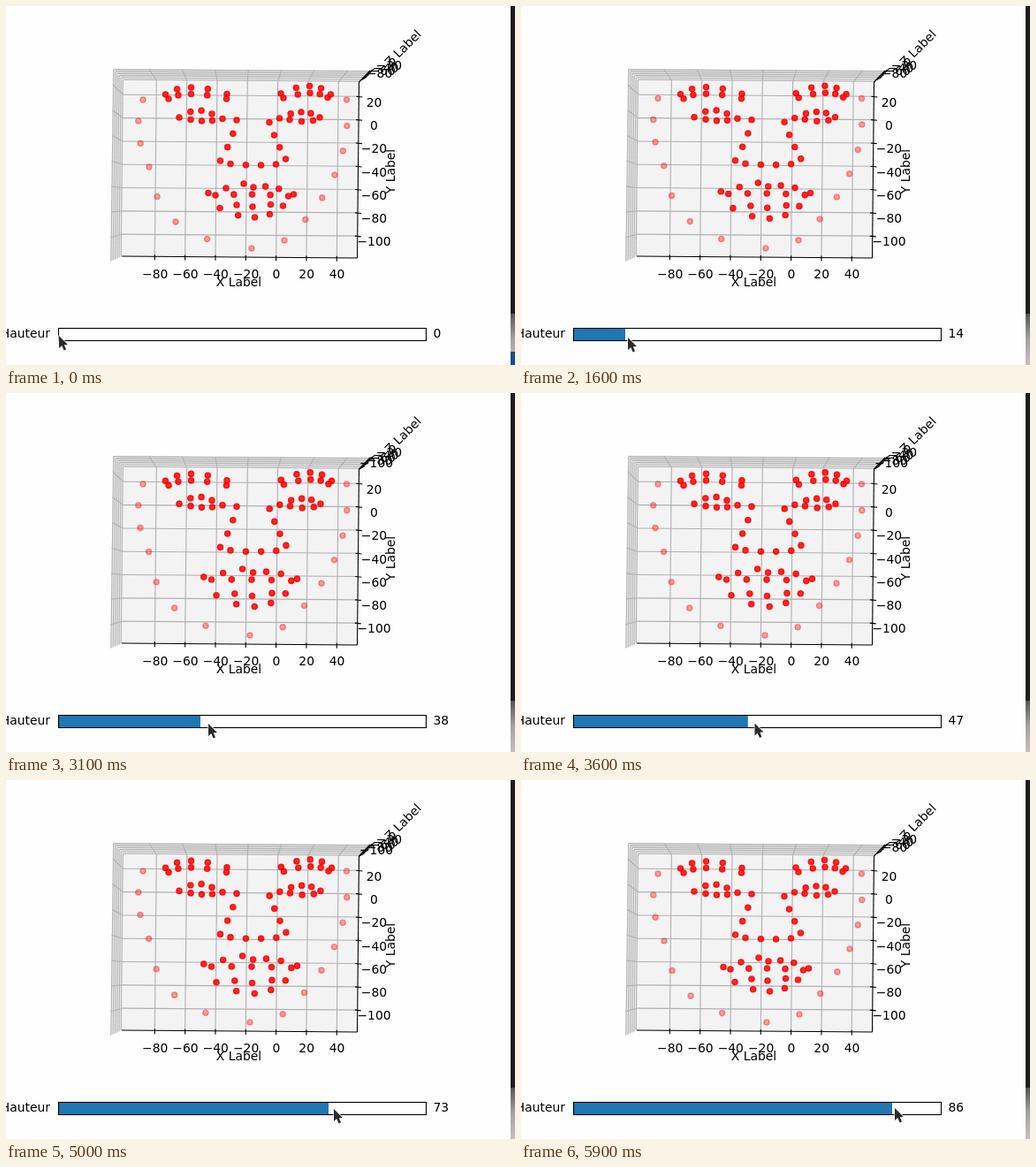
These frames come from a looping animation (576x406 px, 6000 ms). An HTML page with a canvas:

```html
<!DOCTYPE html>
<html lang="fr">
<head>
<meta charset="utf-8">
<style>
html, body { margin: 0; width: 100%; height: 100%; overflow: hidden; background: #fefefe; }
canvas { display: block; }
</style>
</head>
<body>
<canvas id="stage" width="576" height="406"></canvas>
<script>
const ctx = document.getElementById('stage').getContext('2d');
const LOOP = 6000, STEP = 100;

const clamp = v => Math.max(0, Math.min(1, v));
const lerp = (a, b, k) => a + (b - a) * k;
const mix = (p, q, k) => [lerp(p[0], q[0], k), lerp(p[1], q[1], k)];

// n points along the parabola through a start, a middle and an end point
function arc(n, x0, y0, xm, ym, x1, y1) {
  return Array.from({ length: n }, (_, i) => {
    const k = i / (n - 1);
    const fit = (a, m, b) => a * (1 - k) * (1 - 2 * k) + m * 4 * k * (1 - k) + b * k * (2 * k - 1);
    return [fit(x0, xm, x1), fit(y0, ym, y1)];
  });
}

// Each part of the face: its curves and how far a point moves when the mouth is open
const jaw = {
  alpha: 0.36,
  points: [
    arc(4, 155, 106, 150, 142.5, 162, 182),
    arc(4, 171, 215.5, 208, 255, 278, 274),
    arc(7, 315, 265, 372, 191, 385.5, 106)
  ].flat(),
  shift(x, y) {
    const k = ((y - 106) / 168) ** 2;
    return [-2 * k, -3 * (1 - k)];
  }
};
const upper = {
  alpha: 0.84,
  points: [
    arc(5, 180.5, 100, 209.5, 92, 250, 99.5),
    arc(5, 184, 105, 209.5, 99.5, 249.5, 105),
    arc(5, 311, 99, 343.5, 90.5, 367.5, 100),
    arc(5, 314, 104, 344, 98.5, 364, 103.5),
    arc(4, 196, 126, 215, 118.3, 233, 122),
    arc(4, 209, 128.5, 227.5, 130, 245, 127.5),
    arc(5, 309.5, 127, 334, 120, 355, 126),
    arc(3, 321, 128.5, 334.5, 130.5, 347.5, 129.5),
    arc(4, 261, 129, 254, 152, 242.5, 175),
    arc(4, 298, 131.5, 306.5, 153, 316.5, 173),
    arc(4, 254, 178.5, 280, 180, 305.5, 179)
  ].flat(),
  shift: x => [Math.max(0, x - 280) * 0.012, -0.6]
};
const mouth = {
  alpha: 0.84,
  points: [
    arc(3, 229, 211.5, 249, 206, 269, 201),
    arc(4, 280, 205, 301, 205, 325.5, 213),
    arc(5, 242, 228.5, 281.5, 239, 313.5, 226),
    arc(5, 237, 214, 278.5, 213, 319.5, 215),
    arc(3, 261, 225, 279, 227, 299.5, 224.5)
  ].flat(),
  shift: (x, y) => [
    (x - 284) * 0.095,
    y < 220 ? -1.9 - ((x - 283) / 44) ** 2 : 2.5 * (1 - ((x - 280) / 40) ** 2)
  ]
};

// Value at time t on a path of [time, value] pairs
function track(keys, t) {
  let i = 1;
  while (i < keys.length - 1 && t > keys[i][0]) i++;
  const [t0, a] = keys[i - 1], [t1, b] = keys[i];
  return lerp(a, b, clamp((t - t0) / (t1 - t0)));
}

const sliderKeys = [[1600, 118], [2300, 165], [3100, 220], [4200, 301], [5000, 365], [5900, 420]];
const pointerGap = [[0, 0.5], [1600, 3], [2300, 3], [3100, 9], [4200, 6], [5000, 6], [5900, 3]];
const pointerY = [[0, 372], [1600, 374], [2300, 374], [5900, 370]];

const sliderX = t => t < 1600 ? 59.5 + 58.5 * clamp((t - 200) / 1400) ** 1.6 : track(sliderKeys, t);

function line([x0, y0], [x1, y1], color = '#b0b0b0') {
  ctx.strokeStyle = color;
  ctx.lineWidth = 1.1;
  ctx.beginPath();
  ctx.moveTo(x0, y0);
  ctx.lineTo(x1, y1);
  ctx.stroke();
}

function shape(points, fill) {
  ctx.fillStyle = fill;
  ctx.beginPath();
  points.forEach(([x, y]) => ctx.lineTo(x, y));
  ctx.closePath();
  ctx.fill();
}

function text(str, x, y, align = 'center', angle = 0) {
  ctx.save();
  ctx.translate(x, y);
  ctx.rotate(angle);
  ctx.font = '13.89px "DejaVu Sans", sans-serif';
  ctx.textAlign = align;
  ctx.fillStyle = '#000';
  ctx.fillText(String(str).replace('-', '\u2212'), 0, 5);
  ctx.restore();
}

function drawFacePart({ points, shift, alpha }, open) {
  ctx.fillStyle = ctx.strokeStyle = `rgba(255,0,0,${alpha})`;
  ctx.lineWidth = 1.39;
  for (const [x, y] of points) {
    const [dx, dy] = shift(x, y);
    ctx.beginPath();
    ctx.arc(x + dx * open, y + dy * open, 3.1, 0, 7);
    ctx.fill();
    ctx.stroke();
  }
}

function drawAxes(open) {
  const back = [[133, 84], [399.5, 86], [397.5, 285], [131, 283]];
  const front = [[121, 71], [412, 73], [410, 291], [118, 289]];
  const [topLeft, topRight, bottomRight, bottomLeft] = back;
  shape(back, '#f3f3f3');
  shape([front[0], front[1], topRight, topLeft], '#ebebeb');
  shape([front[0], topLeft, bottomLeft, front[3]], '#f0f0f0');

  for (let i = 0; i < 6; i++) {
    const [a, b, , d] = back.map((p, c) => mix(p, front[c], 0.06 + i * 0.175));
    line(a, b);
    line(a, d);
  }
  for (let i = 0; i < 7; i++) {
    const kx = 0.14 + i * 0.1288, ky = 0.082 + i * 0.1322;
    const top = mix(topLeft, topRight, kx), bottom = mix(bottomLeft, bottomRight, kx);
    const left = mix(topLeft, bottomLeft, ky), right = mix(topRight, bottomRight, ky);
    line(bottom, top);
    line(top, mix(front[0], front[1], kx));
    line(right, left);
    line(left, mix(front[0], front[3], ky));
    line([bottom[0], bottom[1] - 2], [bottom[0], bottom[1] + 4], '#000');
    line([right[0] - 3, right[1]], [right[0] + 4, right[1] + 0.7], '#000');
    text(-80 + i * 20, 168.7 + i * 34.3, 303);
    text(20 - i * 20, 416.5, Math.round(109 + i * 26.2));
  }
  line(bottomLeft, bottomRight, '#000');
  line(bottomRight, topRight, '#000');
  line(topRight, front[1], '#000');

  for (let i = open > 0.95 ? 0 : 1; i < 6; i++) {
    const x = 400 + i * 2.2, y = 86 - i * 2.3;
    line([x, y], [x + 6, y - 3.5], '#000');
    text(-100 + i * 20, 419 + i * 3.6, 78.5 - i * 2.9);
  }
  text('X Label', 263.5, 312);
  text('Y Label', 435, 187, 'center', -Math.PI / 2);
  text('Z Label', 449, 47.5, 'center', -Math.PI / 4);
}

function drawSlider(x, value) {
  ctx.fillStyle = '#fff';
  ctx.fillRect(59.5, 364.5, 416, 14);
  ctx.fillStyle = '#1f77b4';
  ctx.fillRect(59.5, 364.5, x - 59.5, 14);
  ctx.strokeStyle = '#000';
  ctx.lineWidth = 1.1;
  ctx.strokeRect(59.5, 364.5, 416, 14);
  text('Hauteur', 50, 370, 'right');
  text(Math.floor(value), 483.5, 370, 'left');
}

function drawPointer(x, y) {
  ctx.save();
  ctx.translate(x, y + 1);
  shape([[0, 0], [0, 14], [3.2, 11], [5.6, 16.4], [8, 15.3], [5.8, 10.2], [10, 10]], '#2b2b2b');
  ctx.strokeStyle = '#fff';
  ctx.lineWidth = 1.4;
  ctx.lineJoin = 'round';
  ctx.stroke();
  ctx.fill();
  ctx.restore();
}

function drawDesktop(t) {
  ctx.fillStyle = '#1d1d1f';
  ctx.fillRect(571, 0, 5, 348);
  const fade = ctx.createLinearGradient(0, 348, 0, 406);
  fade.addColorStop(0, '#555');
  fade.addColorStop(0.5, '#a5a2a2');
  fade.addColorStop(1, '#cbbcbf');
  ctx.fillStyle = fade;
  ctx.fillRect(571, 348, 5, 58);
  if (t < 200) {
    ctx.fillStyle = '#1d4a8c';
    ctx.fillRect(571, 391, 5, 15);
  }
}

function draw(t) {
  const x = sliderX(t), value = (x - 59.5) / 4.16;
  const open = Math.min(clamp(value / 27), clamp((86 - value) / 11));
  ctx.fillStyle = '#fefefe';
  ctx.fillRect(0, 0, 576, 406);
  drawAxes(open);
  [jaw, upper, mouth].forEach(part => drawFacePart(part, open));
  drawSlider(x, value);
  drawDesktop(t);
  drawPointer(x + track(pointerGap, t), track(pointerY, t));
}

function tick() {
  draw(Math.floor(performance.now() % LOOP / STEP) * STEP);
  requestAnimationFrame(tick);
}
tick();
</script>
</body>
</html>
```
